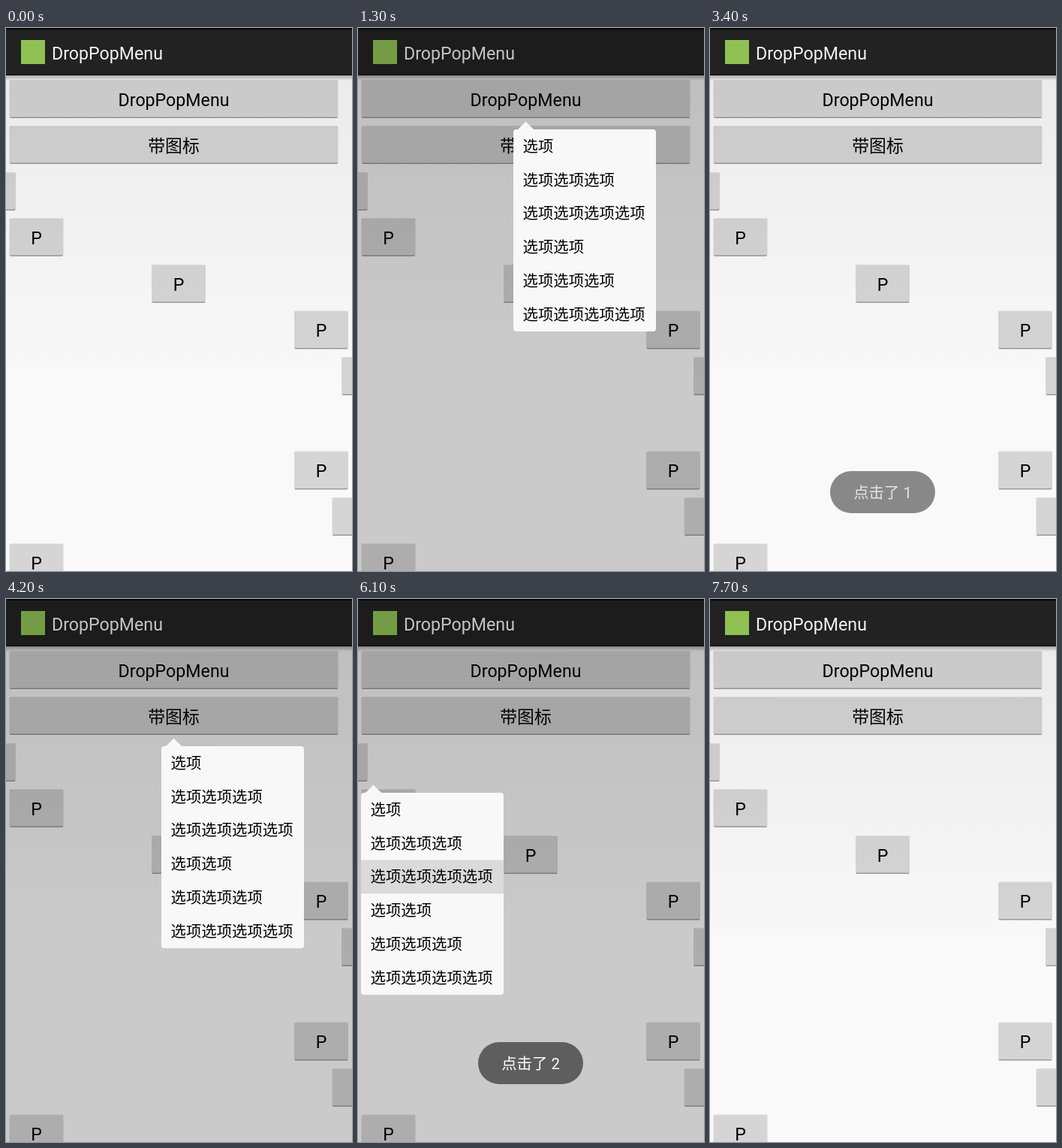
Write an HTML page with a canvas that moves like this. It is 461 by 723 pixels and loops after 8 s.

```html
<!DOCTYPE html>
<html lang="zh-CN">
<head>
<meta charset="utf-8">
<title>DropPopMenu</title>
<style>
html, body { margin: 0; width: 100%; height: 100%; overflow: hidden; background: #f9f9f9; }
canvas { display: block; }
</style>
</head>
<body>
<canvas id="stage" width="461" height="723"></canvas>
<script>
const W = 461, H = 723, LOOP = 8000, STEP = 100;
const c = document.getElementById('stage').getContext('2d');
const FONT = 'Roboto, "Noto Sans CJK SC", "Noto Sans CJK", sans-serif';

// x, y, width, label
const buttons = [
  [4.5, 69, 438, 'DropPopMenu'], [4.5, 130, 438, '带图标'],
  [-59, 192, 72, ''], [4.5, 253, 72, 'P'], [194, 315, 72, 'P'],
  [384, 376.5, 72, 'P'], [447, 438, 72, ''], [384, 563.5, 72, 'P'],
  [434.5, 625, 72, ''], [4.5, 686.5, 72, 'P']
];

const items = [1, 3, 4, 2, 3, 4].map(n => '选项'.repeat(n));

// press: button down; open: menu fully shown; pick: item down;
// close: menu gone; fade/clear: dimming starts and stops lifting
const menus = [
  { button: 0, press: 900, open: 1300, pick: 1700, item: 1, close: 2200, fade: 2200, clear: 2500 },
  { button: 1, press: 3800, open: 4200, pick: 4500, item: 2, close: 5100, fade: 5100, clear: 5300 },
  { button: 2, press: 5300, open: 5600, pick: 6100, item: 2, close: 6700, fade: 6800, clear: 7100 },
  { button: 3, press: 7600, open: LOOP * 2, pick: LOOP * 2, close: 7700, fade: 7600, clear: 7600 }
];

const toasts = [
  { text: '点击了 1', start: 2200, full: 2500, out: 3100, end: 3600 },
  { text: '点击了 2', start: 5100, full: 5300, out: 6800, end: 7300 }
];

const ramp = (t, a, b) => Math.min(1, Math.max(0, (t - a) / (b - a)));

function box(x, y, w, h, r, fill) {
  c.fillStyle = fill;
  c.beginPath();
  c.roundRect(x, y, w, h, r);
  c.fill();
}

function text(str, x, y, size, fill, align = 'left') {
  c.font = `${size}px ${FONT}`;
  c.textAlign = align;
  c.fillStyle = fill;
  c.fillText(str, x, y);
}

function vertical(y0, y1, from, to) {
  const g = c.createLinearGradient(0, y0, 0, y1);
  g.addColorStop(0, from);
  g.addColorStop(1, to);
  return g;
}

function drawPage() {
  c.fillStyle = vertical(64, 474, '#ebebeb', '#f9f9f9');
  c.fillRect(0, 0, W, H);
  c.fillStyle = vertical(63, 70, 'rgba(0,0,0,.3)', 'rgba(0,0,0,0)');
  c.fillRect(0, 63, W, 7);
  c.fillStyle = '#000';
  c.fillRect(0, 0, W, 63);
  c.fillStyle = '#222';
  c.fillRect(0, 2, W, 60);
  c.fillStyle = '#8fc152';
  c.fillRect(20, 16, 32, 32);
  text('DropPopMenu', 61, 41.5, 23.2, '#f3f3f3');
}

function drawButton([x, y, w, label], pressed) {
  box(x, y, w, 51, 2, `rgba(0,0,0,${pressed ? 0.25 : 0.145})`);
  c.fillStyle = 'rgba(255,255,255,.2)';
  c.fillRect(x + 1, y, w - 2, 1);
  c.fillStyle = 'rgba(0,0,0,.28)';
  c.fillRect(x + 1, y + 49.5, w - 2, 1.5);
  const size = /[a-z]/i.test(label) ? 23.2 : 22.8;
  text(label, x + w / 2, y + 34.5, size, '#000', 'center');
}

function drawMenu(m, t) {
  const [bx, by, bw] = buttons[m.button];
  const mid = bx + bw / 2;
  const x = Math.max(4, mid - 16.5);
  const tip = Math.max(x + 16.5, mid);
  const y = by + 66, row = 44.8;
  c.globalAlpha = ramp(t, m.press, m.open);
  box(x, y, 190, 269, 4, '#f8f8f8');
  c.beginPath();
  c.moveTo(tip, y - 10.5);
  c.lineTo(tip + 11, y + 0.5);
  c.lineTo(tip - 11, y + 0.5);
  c.fill();
  if (t >= m.pick) {
    c.fillStyle = 'rgba(0,0,0,.12)';
    c.fillRect(x, y + row * m.item, 190, row);
  }
  items.forEach((s, i) => text(s, x + 12.5, y + 29.8 + row * i, 20.4, '#000'));
  c.globalAlpha = 1;
}

function drawToast(o, t) {
  c.globalAlpha = ramp(t, o.start, o.full) * (1 - ramp(t, o.out, o.end) ** 3);
  box(160, 590, 140, 56, 28, 'rgba(61,61,61,.76)');
  text(o.text, 230, 625.8, 20.4, '#fff', 'center');
  c.globalAlpha = 1;
}

function draw(t) {
  drawPage();
  buttons.forEach((b, i) => {
    const down = menus.some(m => m.button === i && t >= m.press && t < m.press + STEP);
    drawButton(b, down);
  });
  for (const m of menus) {
    const dim = ramp(t, m.press, m.open) * (1 - ramp(t, m.fade, m.clear));
    if (t < m.press || t >= m.clear || dim <= 0) continue;
    c.fillStyle = `rgba(0,0,0,${0.19 * dim})`;
    c.fillRect(0, 0, W, H);
    if (t < m.close) drawMenu(m, t);
  }
  for (const o of toasts) if (t >= o.start && t < o.end) drawToast(o, t);
}

const begin = performance.now();
function tick() {
  const t = (performance.now() - begin) % LOOP;
  draw(Math.floor(t / STEP) * STEP);
  requestAnimationFrame(tick);
}
tick();
</script>
</body>
</html>
```
